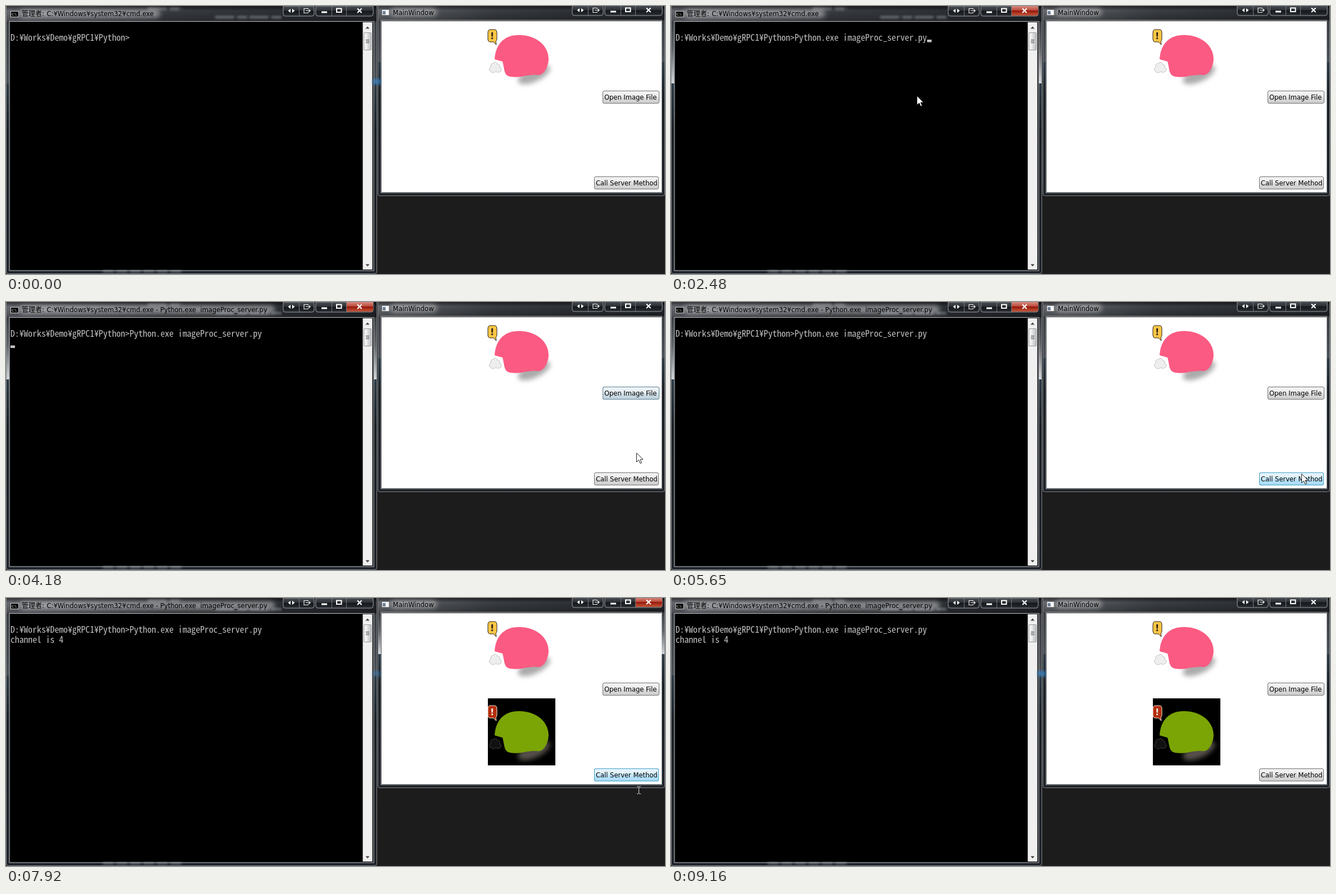
An HTML page for the animation above (9.24 s loop, 1172x478 px).

```html
<!DOCTYPE html>
<html lang="ja">
<head>
<meta charset="utf-8">
<style>
html, body { margin: 0; width: 100%; height: 100%; overflow: hidden; background: #1c1c1c; }
svg { display: block; width: 1172px; height: 478px; }
text { white-space: pre; font: 11.5px "DejaVu Sans", "Noto Sans CJK JP", sans-serif; }
.console text { font: 15.7px "Noto Sans Mono CJK JP", monospace; fill: #c4c4c4; }
</style>
</head>
<body>
<svg id="stage" viewBox="0 0 1172 478"></svg>
<script>
const LOOP = 9240;
const PROMPT = "D:¥Works¥Demo¥gRPC1¥Python>";
const COMMAND = "Python.exe imageProc_server.py";
const TITLE = "C:¥Windows¥system32¥cmd.exe";
const CELL = 7.85;

const rect = (x, y, w, h, attrs = "") =>
  `<rect x="${x}" y="${y}" width="${w}" height="${h}" ${attrs}/>`;
const path = (d, attrs = "") => `<path d="${d}" ${attrs}/>`;
const gradient = (id, stops, across = false) =>
  `<linearGradient id="${id}" x2="${+across}" y2="${+!across}">` +
  stops.map(([at, color]) => `<stop offset="${at}" stop-color="${color}"/>`).join("") +
  `</linearGradient>`;

const defs = `<defs>
  <filter id="soft" x="-20%" y="-100%" width="140%" height="300%"><feGaussianBlur stdDeviation="4"/></filter>
  <filter id="smear" x="-20%" y="-200%" width="140%" height="500%"><feGaussianBlur stdDeviation="2.2"/></filter>` +
  gradient("bar", [[0, "#66696f"], [.4, "#3a3d42"], [1, "#22252a"]], true) +
  gradient("shade", [[0, "#0008"], [.3, "#0000"], [1, "#0004"]]) +
  gradient("lit", [[0, "#3a3d42"], [.45, "#62666b"], [1, "#d3d6d9"]]) +
  gradient("dim", [[0, "#3a3d42"], [1, "#4c5157"]]) +
  gradient("low", [[0, "#2d3c48"], [.25, "#1a1f24"], [1, "#20242a"]]) +
  gradient("caption", [[0, "#4a4e54"], [.45, "#2e3136"], [.5, "#15181b"], [1, "#2a2d32"]]) +
  gradient("red", [[0, "#d58b80"], [.45, "#bb4b3c"], [.5, "#96190c"], [1, "#c4573a"]]) +
  gradient("gray", [[0, "#f3f3f3"], [.5, "#ebebeb"], [.5, "#dddddd"], [1, "#cdcdcd"]]) +
  gradient("blue", [[0, "#eaf6fd"], [.5, "#d9f0fc"], [.5, "#bee6fd"], [1, "#a7d9f5"]]) +
  gradient("down", [[0, "#c4e5f6"], [.5, "#b0dcf3"], [.5, "#98d1ef"], [1, "#78bde2"]]) +
  gradient("thumb", [[0, "#f5f5f5"], [.5, "#e9e9eb"], [.5, "#d9dadc"], [1, "#c4c5c8"]], true) +
  `<g id="captions">
    ${path("M493 0h55v14q0 4-4 4h-47q-4 0-4-4zM551 0h102v14q0 4-4 4h-94q-4 0-4-4z", 'fill="url(#caption)" stroke="#9a9da1"')}
    ${path("M521.5 0v18M579.5 0v18M605.5 0v18", 'stroke="#777a7f"')}
  </g>
  <g id="glyphs">
    ${path("M506 5v7l-4.5-3.5zM509 5v7l4.5-3.5z", 'fill="#fff"')}
    ${path("M537 6V4.5h-7v8h7V11M533 8.5h8m-2.500-2.500l2.500 2.500-2.500 2.500", 'fill="none" stroke="#eee" stroke-width="1.2"')}
    ${rect(561, 9.500, 10, 3, 'fill="#fff"')}
    ${rect(588, 4.500, 8.500, 6.500, 'fill="none" stroke="#fff" stroke-width="2"')}
    ${path("M625 4.500l7.500 7.500m0-7.500l-7.500 7.500", 'stroke="#fff" stroke-width="2.2"')}
  </g>
</defs>`;

// Glass frame; edge is where the light on the side borders stops.
function frame(id, x, w, h, bar, edge) {
  const sides = fill => rect(x, bar, 7, edge - bar, fill) + rect(x + w - 7, bar, 7, edge - bar, fill);
  return rect(x, 0, w, h, 'fill="#202328"') +
    rect(x, edge, w, h - edge, 'fill="url(#low)"') +
    sides('fill="url(#dim)"') +
    `<g id="${id}Lit">${sides('fill="url(#lit)"')}</g>` +
    rect(x, 0, w, bar, 'fill="url(#bar)"') + rect(x, 0, w, bar, 'fill="url(#shade)"') +
    path(`M${x + .5} 0V${h - 4}q0 3.500 4 3.500H${x + w - 4.5}q4 0 4-3.500V0`, 'fill="none" stroke="#83878c"') +
    rect(x + 6, bar, w - 12, h - bar - 6, 'fill="#111" stroke="#b9bdc1"');
}

const captions = (id, dx, dy) =>
  `<use href="#captions" x="${dx}" y="${dy}"/>` +
  path("M606 0h47v13q0 4-4 4h-43z", `id="${id}Close" fill="url(#red)" transform="translate(${dx} ${dy})"`) +
  `<use href="#glyphs" x="${dx}" y="${dy}"/>`;

function picture(y, c) {
  return `<g transform="translate(857 ${y})">
    ${rect(0, 0, 120, 119.5, `fill="${c.back}"`)}
    <ellipse cx="82" cy="93" rx="31" ry="13" transform="rotate(-25 82 93)" fill="${c.shadow}" filter="url(#soft)"/>
    ${path("M12 66C14 36 32 21 60 23C90 25 108 44 108 66C107 82 98 96 88 94C70 92 60 100 40 97C28 95 30 84 26 70Z", `fill="${c.body}"`)}
    ${path("M3 13h10q3 1 3 5v11q0 4-2 5l1 6-5-5H3q-3-1-3-5V18q0-4 3-5z", `fill="${c.bubble}" stroke="${c.line}"`)}
    <text x="4" y="30" style="font-size:16px;font-weight:bold" fill="${c.line}">!</text>
    ${path("M5 88q-5-4 0-8q-1-7 5-7q5-4 7 2q6 0 4 6q6 3 1 7q-4 3-8 0q-5 4-9 0z", `fill="${c.smoke}" stroke="${c.puff}"`)}
  </g>`;
}

function button(id, x, y, w, label) {
  const box = (fill, stroke, part) =>
    rect(x + .5, y + .5, w, 22, `rx="2.500" fill="${fill}" stroke="${stroke}" id="${id}${part}"`);
  return box("url(#gray)", "#707070", "Base") + box("url(#blue)", "#3c9fc8", "Hover") +
    box("url(#down)", "#2c628b", "Down") +
    `<text x="${x + 3}" y="${y + 15.5}">${label}</text>`;
}

document.getElementById("stage").innerHTML = defs +
  rect(0, 0, 1172, 478, 'fill="#1c1c1c"') +
  frame("cmd", 0, 660, 478, 27.5, 138) +
  `<g filter="url(#smear)" stroke="#aab0b6" stroke-width="4" opacity=".55">
    ${path("M252 5h62M372 20h118", 'stroke-dasharray="34 5 18 4"')}
    ${path("M172 473h142", 'stroke-dasharray="20 4"')}
  </g>` +
  rect(24, 6, 250, 15, 'id="glow" rx="7" fill="#fff" opacity=".42" filter="url(#soft)"') +
  rect(8.5, 9.5, 14, 10, 'fill="#000" stroke="#ccc"') +
  `<text x="10" y="17" style="font-size:6px" fill="#fff">C:\\.</text>
  <text x="28" y="18" style="font-size:12px">管理者:</text><text id="title" x="72.500" y="18"></text>` +
  captions("cmd", 0, 0) +
  rect(8, 29, 626, 441, 'fill="#000"') +
  rect(634.5, 29, 17, 441, 'fill="#f0f0f1"') +
  rect(636.5, 47.5, 13, 31, 'rx="1.500" fill="url(#thumb)" stroke="#97999c"') +
  path("M640 60.500h6m-6 2.500h6m-6 2.500h6", 'stroke="#555"') +
  path("M639.500 40.500l3.500-4 3.500 4zM639.500 460.500l3.500 4 3.500-4z", 'fill="#444"') +
  `<g class="console"><text id="line" x="8" y="62"></text><text id="reply" x="8" y="80">channel is 4</text>
    ${rect(0, 0, 8, 4.5, 'id="caret" fill="#c4c4c4"')}</g>` +
  frame("main", 661, 511, 339, 25.5, 100) +
  rect(684, 4, 82, 14, 'rx="7" fill="#fff" opacity=".42" filter="url(#soft)"') +
  rect(668.5, 6.5, 13, 10, 'fill="#f4f5f6" stroke="#777"') + rect(670, 9, 5, 6, 'fill="#6c7f95"') +
  `<text x="688" y="15.500">MainWindow</text>` +
  captions("main", 514, -1) +
  rect(652, 130, 15, 10, 'id="spark" fill="#3284cf" opacity=".65" filter="url(#smear)"') +
  rect(668, 27, 498, 305, 'fill="#fff"') +
  picture(29, { back: "#fff", shadow: "#aaa", body: "#fb5a82", bubble: "#fcc544", line: "#2a2020", smoke: "#eee", puff: "#c4c4c4" }) +
  `<g id="result">${picture(179, { back: "#000", shadow: "#55504a", body: "#7ba405", bubble: "#b52d0c", line: "#f0eee4", smoke: "#111", puff: "#3b3b3b" })}</g>` +
  button("open", 1061, 151, 100, "Open Image File") +
  button("call", 1046, 304, 114, "Call Server Method") +
  path("M0 0v16l4-3.500 2.500 6 2.500-1-2.500-6h5z", 'id="arrow" fill="#fff" stroke="#222"') +
  path("M-3.500-6.500h2.500l1 1 1-1h2.500M0-5.500v11M-3.500 6.500h2.500l1-1 1 1h2.500", 'id="beam" fill="none" stroke="#ddd"');

const el = id => document.getElementById(id);
const within = (t, a, b) => t >= a && t < b;
const show = (id, on) => el(id).setAttribute("visibility", on ? "visible" : "hidden");
const put = (id, x, y) => el(id).setAttribute("transform", `translate(${x} ${y})`);

// Piecewise linear value from rows of [time, ...values].
function track(rows, t) {
  const i = rows.findIndex(row => row[0] > t);
  if (i < 0) return rows.at(-1).slice(1);
  if (i === 0) return rows[0].slice(1);
  const [a, b] = [rows[i - 1], rows[i]];
  const k = (t - a[0]) / (b[0] - a[0]);
  return a.slice(1).map((v, n) => v + (b[n + 1] - v) * k);
}

const POINTER = [
  [66, 786, 460], [374, 437, 160], [2990, 437, 160], [3200, 560, 170], [3500, 860, 165],
  [3840, 1100, 162], [3950, 1116, 185], [4140, 1121, 268], [4450, 1121, 306],
  [7850, 1121, 306], [7919, 1125, 342], [8100, 1125, 372], [8530, 1125, 472]
];
const OPEN_GLOW = [[3780, 0], [3860, 1], [3980, 1], [4300, 0]];
const CALL_GLOW = [[4370, 0], [4600, 1], [7950, 1], [8530, .7], [8680, .7], [9100, 0]];

function draw(t) {
  const cmdActive = within(t, 380, 5820), mainActive = within(t, 5820, 8680);
  const running = t >= 2550;
  for (const [id, on] of [["cmd", cmdActive], ["main", mainActive]]) {
    show(id + "Close", on);
    show(id + "Lit", on);
  }
  show("spark", !cmdActive);
  el("spark").setAttribute("opacity", mainActive ? .35 : .65);
  el("title").textContent = TITLE + (running ? " - Python.exe  imageProc_server.py" : "");
  el("glow").setAttribute("width", running ? 454 : 250);

  const typed = t < 840 ? "" : t < 920 ? "py" : t < 1380 ? "pyt" : t < 1460 ? "Python.exe" : COMMAND;
  el("line").textContent = PROMPT + typed;
  show("reply", t >= 6810);
  show("result", t >= 6900);

  const blink = [[380, 1920], [2480, 2550], [3010, 3480], [4020, 4560], [5100, 5650]];
  show("caret", blink.some(([a, b]) => within(t, a, b)));
  put("caret", running ? 8 : 8 + CELL * (PROMPT.length + typed.length), running ? 77.5 : 60);

  el("openHover").setAttribute("opacity", track(OPEN_GLOW, t)[0]);
  el("callHover").setAttribute("opacity", track(CALL_GLOW, t)[0]);
  show("openDown", false);
  show("callDown", within(t, 5820, 6900));

  const tick = Math.floor((t - 66) / 77) * 77 + 66;
  const [x, y] = track(POINTER, tick);
  const visible = within(t, 70, 8530);
  show("arrow", visible && !(t > 7900));
  show("beam", visible && t > 7900);
  put("arrow", x + .5, y + .5);
  put("beam", x + .5, y + .5);
}

const start = performance.now();
function loop() {
  draw((performance.now() - start) % LOOP);
  requestAnimationFrame(loop);
}
loop();
</script>
</body>
</html>
```
